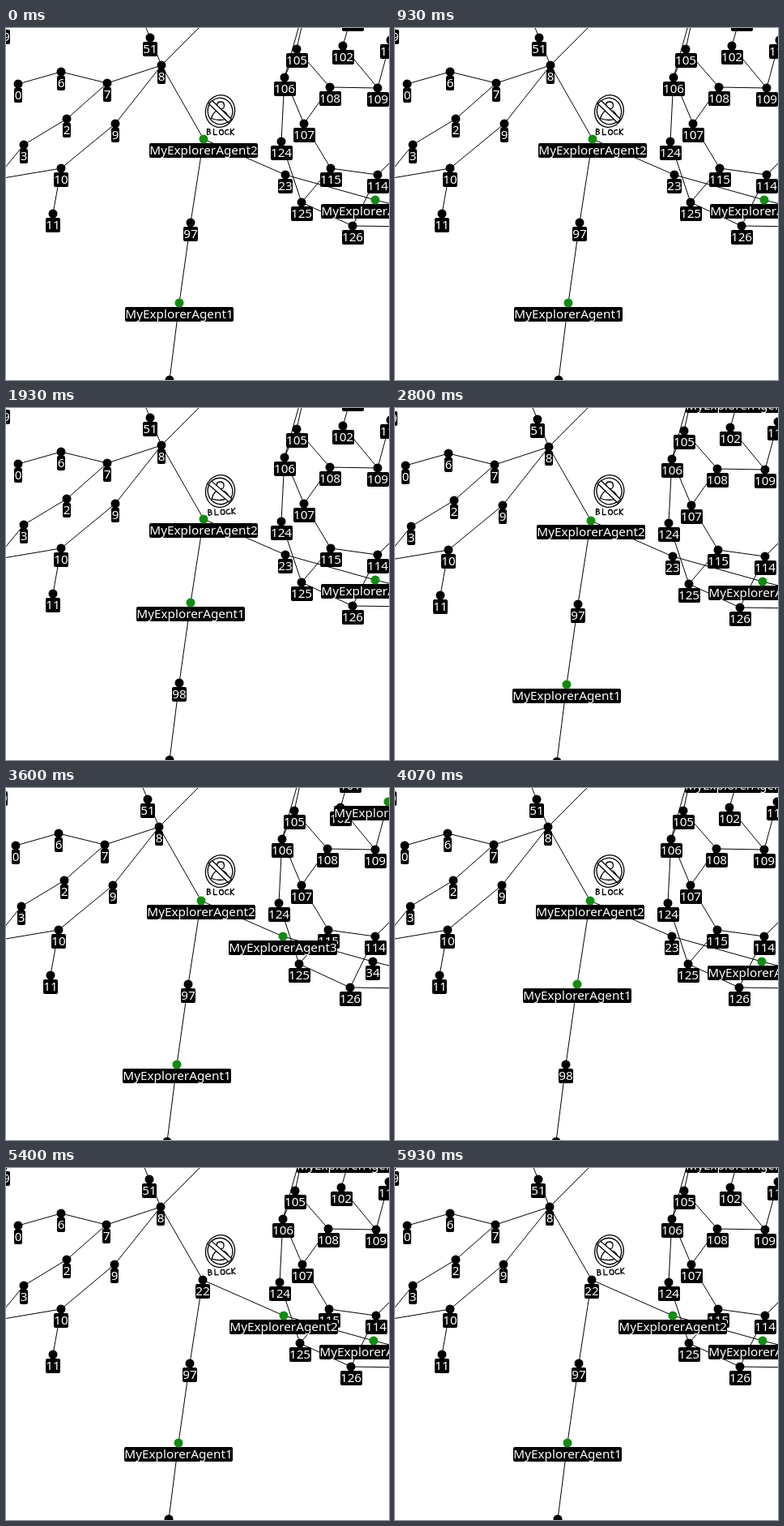
Animation, 473 px wide and 434 px high, one loop 5990 ms. Source, as an HTML page with a canvas:

```html
<!DOCTYPE html>
<html lang="en">
<head>
<meta charset="utf-8">
<title>Explorer agents on a graph</title>
<style>
html, body { margin: 0; width: 100%; height: 100%; overflow: hidden; background: #fff; }
canvas { display: block; }
</style>
</head>
<body>
<canvas id="stage" width="473" height="434"></canvas>
<script>
const ctx = document.getElementById('stage').getContext('2d');
const LOOP = 5990, TICK = 1000, SKETCH_STEP = 200;
const GREEN = '#148a14';

// Nodes beyond the stage only carry edges out of view
const nodes = {
  49: [-4, -3], 51: [178, 12], 8: [192, 46], 0: [15, 69], 6: [68, 54],
  7: [125, 68], 2: [75, 112], 9: [135, 118], 3: [22, 144], 10: [68, 173],
  11: [58, 229], 22: [244, 137], 97: [228, 240], 98: [214, 339], 99: [202, 434],
  105: [359, 26], 102: [416, 22], 106: [344, 61], 108: [400, 73], 109: [459, 74],
  107: [368, 118], 124: [340, 140], 115: [401, 173], 23: [345, 181],
  114: [459, 181], 34: [456, 212], 125: [365, 215], 126: [428, 244],
  101: [428, -19], 110: [475, 15],
  50: [151, -53], 52: [290, -52], 4: [-15, 189], 12: [-15, 187],
  104: [378, -60], 35: [500, 223], 127: [500, 245], 113: [495, 145]
};

const chains = [
  [50, 51, 8, 22, 97, 98, 99], [52, 8, 7, 6, 0], [7, 2, 3, 4], [8, 9, 10, 11],
  [10, 12], [22, 23, 34, 35], [104, 105, 106, 124, 125, 126, 114, 115, 125],
  [104, 106, 107, 115], [105, 108, 109, 102, 101], [107, 108], [109, 110],
  [126, 127], [114, 113]
];

const person = new Path2D('M-11 9C-9 2-5-1-2-1Q4-1 7 2Q10 5 10 9Q0 13-11 9M-4-7C-4-13 5-13 5-7C5-1-4-1-4-7Z');
const slash = new Path2D('M-14-9L-10-13L14 10L10 14Z');
const word = new Path2D('M-16-3V4M-16-3Q-11-3-13 0H-16M-14 0Q-9 3-16 4' +
  'M-8-3V4H-4M-1 1C-1-3 4-3 4 1C4 5-1 5-1 1ZM10-2Q6-2 6 1Q6 5 11 3M13-3V4M17-3L13 1L17 4');

const ramp = (t, from, to) => Math.min(1, Math.max(0, (t - from) / (to - from)));

// Where agents 1 to 4 stand; the fourth arrives late
function agentPosts(tick) {
  const detour = tick === 3;
  const posts = [
    tick % 3 === 1 ? 97 : 98,
    tick === 5 ? 23 : 22,
    detour ? 23 : 34
  ];
  if (tick > 1) posts.push(detour ? 110 : 101);
  return posts;
}

// The layout resettles a little after some ticks
function layoutAt(t) {
  const pan = ramp(t, 2000, 2130);
  const creep = ramp(t, 3000, 3530);
  const back = ramp(t, 5000, 5200);
  const sink = ramp(t, 1600, 1930);
  return ([x, y]) => [
    Math.round(x - 2 * pan - .8 * creep + back * (2.8 - .0045 * x)),
    Math.round(y + .4 * sink + 1.2 * pan + back * (.5 - .006 * y))
  ];
}

function dot([x, y], color) {
  ctx.fillStyle = color;
  ctx.beginPath();
  ctx.arc(x, y, 5.5, 0, 7);
  ctx.fill();
}

function label([x, y], text) {
  const w = Math.round(ctx.measureText(text).width) + 1;
  ctx.fillStyle = '#000';
  ctx.beginPath();
  ctx.roundRect(Math.round(x - w / 2), y + 5, w, 18, 2);
  ctx.fill();
  ctx.fillStyle = '#fff';
  ctx.fillText(text, x, y + 19);
}

function drawGraph(t) {
  const place = layoutAt(t);
  const at = id => place(nodes[id]);
  const agents = agentPosts(Math.floor(t / TICK));

  ctx.strokeStyle = '#000';
  ctx.lineWidth = 1;
  ctx.beginPath();
  for (const chain of chains)
    chain.forEach((id, i) => i ? ctx.lineTo(...at(id)) : ctx.moveTo(...at(id)));
  ctx.stroke();

  ctx.font = '15.3px "Noto Sans", sans-serif';
  ctx.textAlign = 'center';
  const free = Object.keys(nodes).filter(id => !agents.includes(+id));
  for (const id of free) dot(at(id), '#000');
  for (const id of free) label(at(id), id);
  agents.forEach((id, i) => label(at(id), 'MyExplorerAgent' + (i + 1)));
  for (const id of agents) dot(at(id), GREEN);
}

function ring(rx, ry, tilt) {
  ctx.beginPath();
  ctx.ellipse(0, 0, rx, ry, tilt, 0, 7);
  ctx.stroke();
}

// Hand-drawn sign, redrawn slightly differently at every step
function drawSketch(t) {
  const step = Math.floor(t / SKETCH_STEP);
  const tilt = -.06 * (step % 2);
  const wobble = .3 * Math.sin(step * Math.PI / 3);
  ctx.save();
  ctx.lineWidth = 1.3;
  ctx.lineJoin = ctx.lineCap = 'round';
  ctx.translate(264.5, 102.5);
  ctx.rotate(tilt);
  ring(18 + wobble, 20, .25);
  ring(15.3 + wobble, 16.3, -.2);
  ctx.stroke(person);
  ctx.fillStyle = '#fff';
  ctx.fill(slash);
  ctx.stroke(slash);
  ctx.translate(0, 25);
  ctx.stroke(word);
  ctx.restore();
}

function frame() {
  const t = performance.now() % LOOP;
  ctx.fillStyle = '#fff';
  ctx.fillRect(0, 0, 473, 434);
  drawGraph(t);
  drawSketch(t);
  requestAnimationFrame(frame);
}
frame();
</script>
</body>
</html>
```
